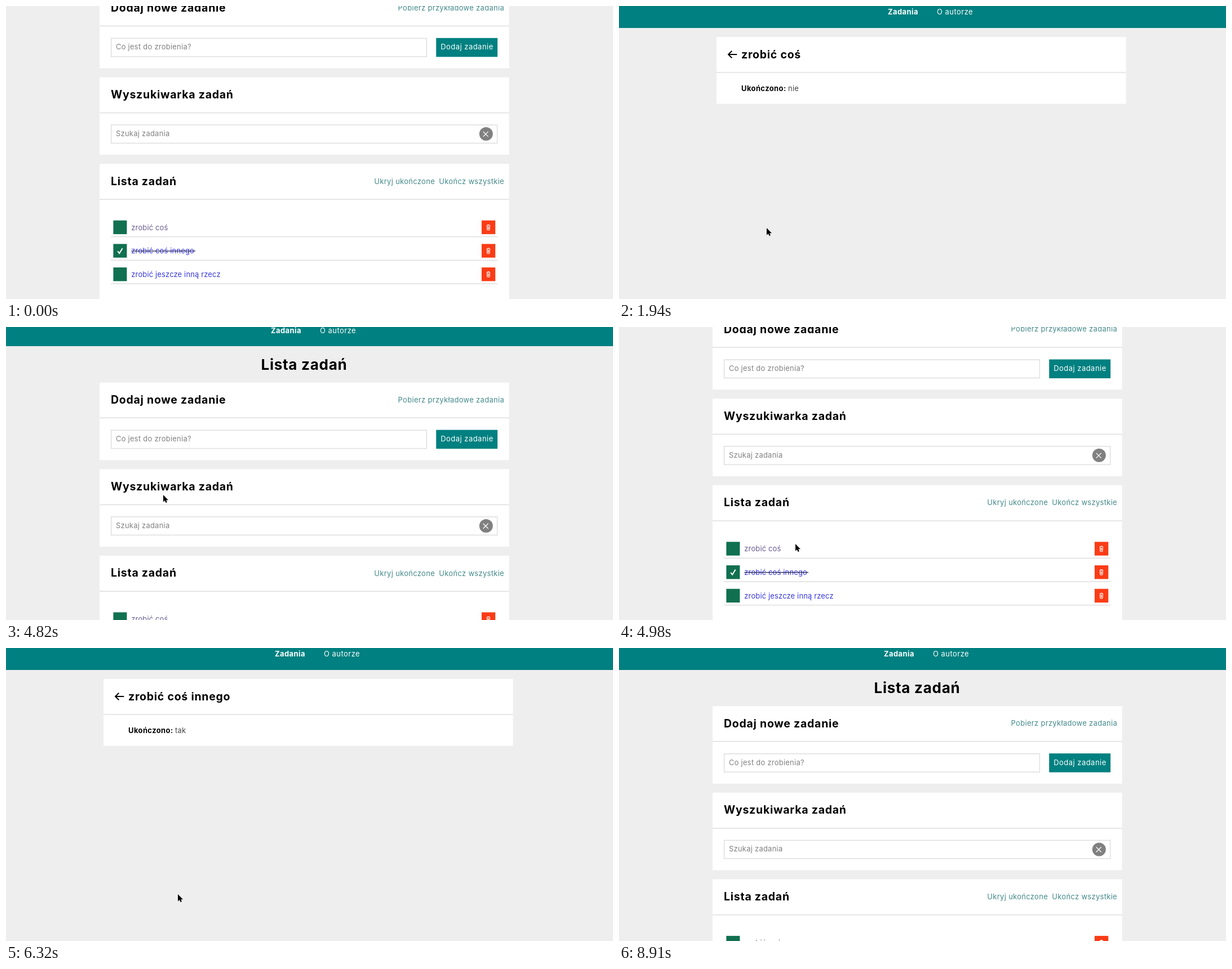
Animation of 1077x520 px, one loop 9350 ms. Source, as an HTML page:

```html
<!DOCTYPE html>
<html lang="pl">
<head>
<meta charset="utf-8">
<title>Lista zadań</title>
<style>
  html, body { margin: 0; width: 100%; height: 100%; overflow: hidden; background: #eee; }
  svg { display: block; width: 1077px; height: 520px; }
  text { font: 400 12.9px Inter, "Open Sans", sans-serif; letter-spacing: .28px; }
  .bold { font-weight: 700; letter-spacing: .035em; }
  .h1 { font-size: 26px; font-weight: 700; letter-spacing: .028em; }
  .h2 { font-size: 19.5px; font-weight: 700; letter-spacing: .038em; }
  .link { fill: #44898b; letter-spacing: .35px; text-anchor: end; }
  .hint { fill: #808080; }
  .task { fill: #3838dd; letter-spacing: .18px; }
  .seen { fill: #6a5c90; }
  .white { fill: #fff; }
  .light { fill: #fff; letter-spacing: .52px; }
  .mid { text-anchor: middle; }
  .teal { fill: #008080; }
  .bar { fill: #008080; shape-rendering: crispEdges; }
  .rule { fill: #ddd; }
  .field { fill: #fff; stroke: #ddd; stroke-width: 1.4; }
  .line { fill: none; stroke: #fff; }
</style>
</head>
<body>
<svg viewBox="0 0 1077 520">
  <defs>
    <g id="nav">
      <text class="bold white" x="470" y="15">Zadania</text>
      <text class="light" x="557" y="15">O autorze</text>
    </g>
    <g id="bin">
      <rect width="24.3" height="24.3" fill="#fa3c16"/>
      <path class="line" d="M8.8 8.6h6.4M10.4 7.6h3.2M9.5 9l.4 8h4.2l.4-8M11.2 10.5v5M12.8 10.5v5"/>
    </g>
  </defs>
  <rect width="1077" height="520" fill="#eee"/>

  <g id="list">
    <rect class="bar" width="1077" height="38.7"/>
    <use href="#nav"/>
    <text class="h1" x="452.5" y="80">Lista zadań</text>

    <rect class="white" x="166" y="103.2" width="726.5" height="137.5"/>
    <text class="h2" x="186" y="140.7">Dodaj nowe zadanie</text>
    <text class="link" x="884" y="138">Pobierz przykładowe zadania</text>
    <rect class="rule" x="166" y="165" width="726.5" height="1.4"/>
    <rect class="field" x="186.6" y="187.7" width="559.8" height="32.4"/>
    <text class="hint" x="195" y="207.6">Co jest do zrobienia?</text>
    <rect class="teal" x="763.2" y="187.1" width="108.9" height="33.5"/>
    <text class="light mid" x="818" y="207.6">Dodaj zadanie</text>

    <rect class="white" x="166" y="256.8" width="726.5" height="137.5"/>
    <text class="h2" x="186" y="294.3">Wyszukiwarka zadań</text>
    <rect class="rule" x="166" y="319.2" width="726.5" height="1.4"/>
    <rect class="field" x="186.6" y="341.4" width="685" height="32.4"/>
    <text class="hint" x="195" y="361.4">Szukaj zadania</text>
    <circle cx="851.8" cy="357.4" r="12" fill="#808080"/>
    <path class="line" stroke-width="1.3" d="M846.6 353.2l9 9m0-9l-9 9"/>

    <rect class="white" x="166" y="410.4" width="726.5" height="270"/>
    <text class="h2" x="186" y="447.9">Lista zadań</text>
    <text class="link" x="761" y="446">Ukryj ukończone</text>
    <text class="link" x="884" y="446">Ukończ wszystkie</text>
    <rect class="rule" x="166" y="472.9" width="726.5" height="1.4"/>
    <g id="rows"></g>
  </g>

  <g id="detail">
    <rect class="bar" width="1077" height="38.7"/>
    <use href="#nav" x="7"/>
    <rect class="white" x="173" y="55" width="726.5" height="118.6"/>
    <path d="M209.3 86H194.5M200.3 79.8L194 86l6.3 6.2" fill="none" stroke="#000" stroke-width="1.9"/>
    <text class="h2" id="title" x="217" y="92.5"></text>
    <rect class="rule" x="173" y="117.3" width="726.5" height="1.4"/>
    <text class="bold" x="217" y="150.5">Ukończono:</text>
    <text id="done" x="300" y="150.5" fill="#444"></text>
  </g>

  <g id="cursor">
    <circle id="press" r="9.7" fill="#ffff28" fill-opacity=".6"/>
    <path id="arrow" d="M0 0V12.6L2.8 10 4.7 14 6.9 13 5.1 9.2H9Z"/>
    <path id="hand" stroke="#fff" stroke-opacity=".6" stroke-width=".4"
      d="M-1.2 1Q0-.6 1.2 1V5L5.4 5.8Q7 6.3 6.8 8L6 12V14.8H-1.6V13L-4.8 9Q-5.6 7.4-4 7.2L-1.2 9Z"/>
  </g>
</svg>
<script>
const $ = id => document.getElementById(id);
const LOOP = 9350;

const ease = {
  smooth: p => p * p * (3 - 2 * p),
  linear: p => p,
  speedUp: p => p ** 1.4,
  slowDown: p => 1 - (1 - p) ** 2
};

// Legs: start ms, end ms, steps, target, easing, optional curve control point
const START = [675, 464];
const pointerLegs = [
  [300, 1140, 11, [267, 402], "smooth"],
  [1300, 1590, 4, [262, 395], "smooth"],
  [1940, 1940, 1, [262, 394], "linear"],
  [2420, 3330, 12, [221, 123], "smooth", [315, 290]],
  [3410, 3500, 2, [208, 106], "linear"],
  [3670, 3910, 4, [198.5, 80], "smooth"],
  [4400, 4820, 6, [279, 298], "speedUp"],
  [4900, 4980, 2, [313, 385], "linear"],
  [5060, 5330, 4, [320, 453], "slowDown"],
  [5400, 5570, 3, [305, 439], "linear"],
  [5820, 5820, 1, [304.7, 438], "linear"],
  [6240, 6240, 1, [305, 437], "linear"],
  [6560, 6560, 1, [294, 406], "linear"],
  [6730, 7150, 6, [206, 160], "smooth"],
  [7330, 7500, 3, [204, 91], "smooth"],
  [7660, 7760, 2, [204, 88], "linear"],
  [8330, 8910, 8, [1056, 530], "smooth"]
];
const scrollLegs = [
  [4150, 4150, 1, [0], "linear"],
  [4820, 4820, 1, [4.5], "linear"],
  [4900, 4980, 2, [129.6], "linear"],
  [5060, 5060, 1, [130.3], "linear"],
  [8090, 8090, 1, [0], "linear"]
];

const handTimes = [[1380, 1940], [3830, 4150], [5480, 6240], [7500, 8090]];
const pressTimes = [[1750, 1840], [3910, 4150], [6000, 6160], [7930, 8090]];
const pages = [
  [1840, 4150, "zrobić coś", "nie"],
  [6160, 8090, "zrobić coś innego", "tak"]
];

const during = (spans, t) => spans.find(([a, b]) => t >= a && t < b);
const show = (id, on) => $(id).setAttribute("visibility", on ? "visible" : "hidden");
const move = (id, x, y) => $(id).setAttribute("transform", `translate(${x} ${y})`);

function walk(legs, from, t) {
  let at = from;
  for (const [start, end, steps, to, curve, bend] of legs) {
    if (t < start) break;
    const step = t >= end ? steps
      : 1 + Math.floor((t - start) / (end - start) * (steps - 1) + .2);
    const p = ease[curve](Math.min(step, steps) / steps), q = 1 - p;
    at = at.map((v, i) => bend
      ? q * q * v + 2 * p * q * bend[i] + p * p * to[i]
      : q * v + p * to[i]);
  }
  return at;
}

$("rows").innerHTML = [
  ["zrobić coś", "seen"], ["zrobić coś innego", "", true], ["zrobić jeszcze inną rzecz", ""]
].map(([name, kind, done], i) => `
  <g transform="translate(0 ${510.9 + i * 41.7})">
    <rect x="190.4" width="24" height="24.3" fill="#107050"/>
    <text class="task ${kind}" x="222.3" y="17">${name}</text>
    ${done ? `<path class="line" stroke-width="2" d="M198.2 12.8l3 3.8 5.4-9"/>
      <rect x="222.3" y="12" width="113.7" height="1.2" fill="#181850"/>` : ""}
    <use href="#bin" x="843.9"/>
    <rect class="rule" x="186" y="28.2" width="686" height="1.4"/>
  </g>`).join("");

function draw(t) {
  const page = during(pages, t);
  show("list", !page);
  show("detail", page);
  if (page) {
    $("title").textContent = page[2];
    $("done").textContent = page[3];
  }
  move("list", 0, -walk(scrollLegs, [130.3], t)[0]);

  const seen = t >= 300 && t < 8910, hand = during(handTimes, t);
  move("cursor", ...walk(pointerLegs, START, t));
  show("press", seen && during(pressTimes, t));
  show("hand", seen && hand);
  show("arrow", seen && !hand);
}

const begin = performance.now();
function tick() {
  draw((performance.now() - begin) % LOOP);
  requestAnimationFrame(tick);
}
tick();
</script>
</body>
</html>
```
